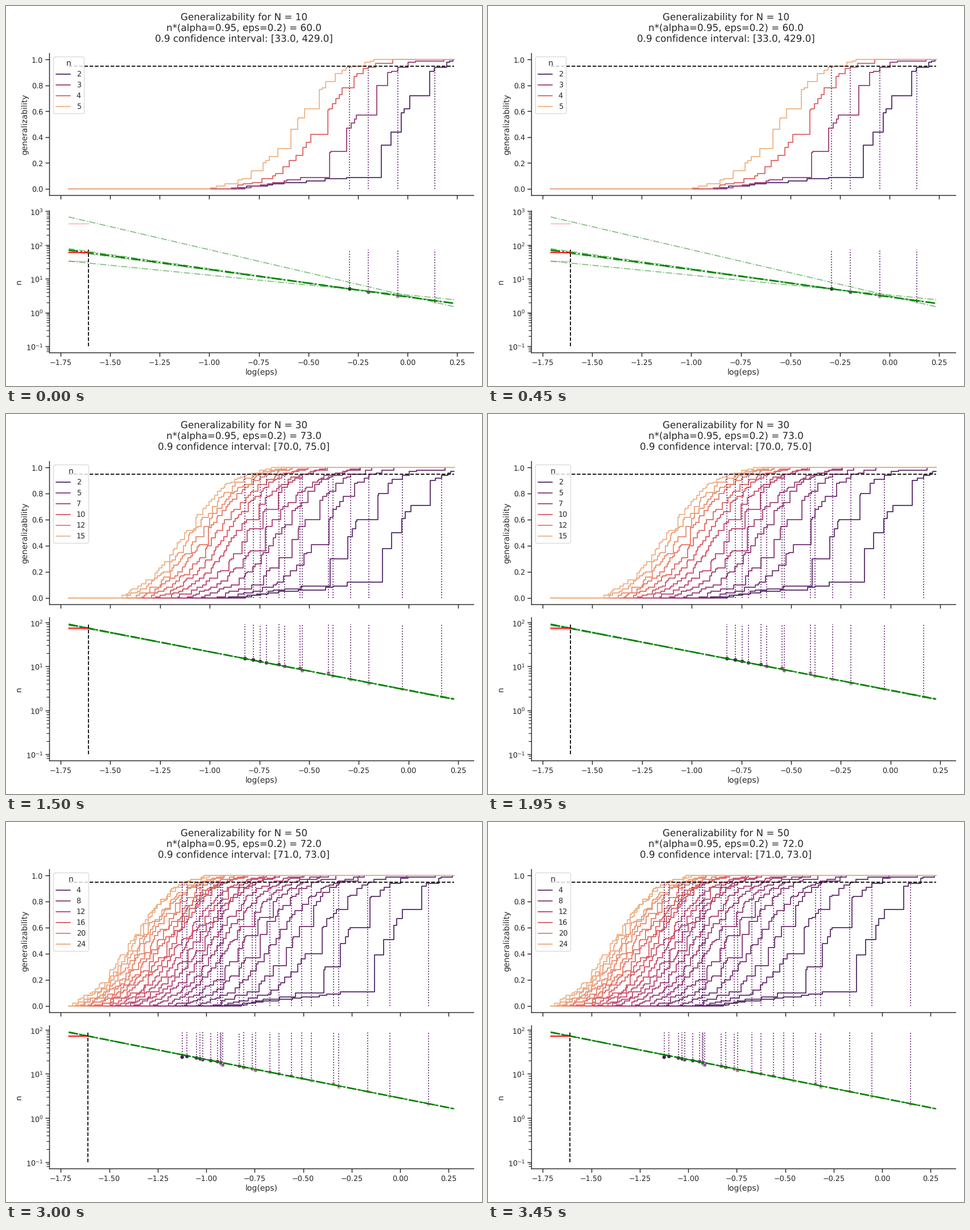
A matplotlib script for the animation above (3.75 s loop, 837 px wide and 669 px high).

```python
import numpy as np
import matplotlib.pyplot as plt
from matplotlib.animation import FuncAnimation
from matplotlib.colors import LinearSegmentedColormap
from matplotlib.lines import Line2D

W, H, DPI = 837, 669, 96
K = 0.872  # point scale of the whole figure
INK = "0.15"
X0, X_EPS = np.log(0.2) - 0.1, np.log(0.2)
LEFT, RIGHT = 76.3, 822.0
DOTS = "#5a1768"

plt.rcParams.update({
    "font.family": "DejaVu Sans",
    "font.size": 12 * K,
    "text.hinting": "none",
    "text.color": INK, "axes.labelcolor": INK, "axes.edgecolor": INK,
    "xtick.color": INK, "ytick.color": INK,
    "axes.labelsize": 12 * K, "axes.labelpad": 4 * K, "axes.linewidth": 1.25 * K,
    "axes.spines.top": False, "axes.spines.right": False,
    "lines.linewidth": 1.5 * K, "lines.solid_capstyle": "round",
    "legend.fontsize": 11 * K, "legend.title_fontsize": 12 * K,
    "patch.linewidth": K,
})
for axis in ("xtick", "ytick"):
    plt.rcParams.update({
        f"{axis}.labelsize": 11 * K,
        f"{axis}.major.size": 6 * K, f"{axis}.major.width": 1.25 * K,
        f"{axis}.minor.size": 4 * K, f"{axis}.minor.width": K,
        f"{axis}.major.pad": 3.5 * K, f"{axis}.minor.pad": 3.5 * K,
    })

CURVES = LinearSegmentedColormap.from_list("curves", [
    "#4b2362", "#6c2b6d", "#8f3371", "#b13c6c",
    "#d14a61", "#e3685c", "#e98d6b", "#edb081"])
POINTS = LinearSegmentedColormap.from_list("points", ["#edd1cb", "#aa688f", "#2d1e3e"])

# fit, high and low give n at the left and right end of each line
RUNS = [
    dict(N=10, best=60, ci=(33, 429), x_end=0.2355, step=1,
         fit=(71.3, 1.865), high=(677, 1.48), low=(33.3, 2.4)),
    dict(N=20, best=85, ci=(77, 98), x_end=0.237, step=1.5,
         fit=(102.7, 1.7), high=(125, 1.66), low=(92, 1.78)),
    dict(N=30, best=73, ci=(70, 75), x_end=0.23, step=2.5,
         fit=(90, 1.78), high=(92.3, 1.76), low=(86, 1.86)),
    dict(N=40, best=76, ci=(74, 77), x_end=0.224, step=3,
         fit=(92.5, 1.81), high=(94.8, 1.79), low=(90, 1.84)),
    dict(N=50, best=72, ci=(71, 73), x_end=0.279, step=4,
         fit=(88, 1.62), high=(89.3, 1.61), low=(86.5, 1.63)),
]

LEVELS = np.arange(1, 101)
SHAPE_P = (1, 10, 20, 30, 40, 50, 60, 70, 80, 90, 95, 97, 100)
BELOW = np.array([-1, -0.65, -0.4, -0.18, 0])
ABOVE = np.array([0.16, 0.33, 0.53, 0.77, 1, 1.14, 1.4])


def sizes(run):
    return np.arange(2, run["N"] // 2 + 1)


def fit_x(run, n):
    """Position where the fitted line reaches n; small n fall a little short."""
    start, end = np.log(run["fit"])
    on_line = X0 + (start - np.log(n)) / (start - end) * (run["x_end"] - X0)
    return on_line - 0.15 / n**2


def crossings(run):
    """Positions where each curve reaches 95 percent."""
    n = sizes(run)
    rng = np.random.default_rng(run["N"])
    return fit_x(run, n) + rng.normal(0, 0.02, len(n))


def samples(run, n, q95):
    """Sorted positions at which the curve of n climbs by one percent."""
    rng = np.random.default_rng(100 * run["N"] + n)
    q50 = fit_x(run, n) - 0.32 + 0.2 / n
    lower = q50 + BELOW * (0.24 - 0.0015 * n)
    tail = lower[0] - 0.1 - 2 / n**2
    xs = np.r_[tail, lower, q50 + ABOVE * (q95 - q50)]
    x = np.interp(LEVELS, SHAPE_P, xs) + rng.normal(0, 0.008, 100)
    # Few distinct values exist for small n, so steps cluster
    gaps = np.random.default_rng(n).exponential(max(0.1 / n, 0.009), 800)
    grid = -2 + np.cumsum(gaps)
    x = np.sort(grid[np.searchsorted(grid, x).clip(max=len(grid) - 1)])
    x[:94] = np.minimum(x[:94], q95)
    x[94:] = np.maximum(x[94:], q95)
    return x


def add_axes(fig, top, bottom, x_end):
    ax = fig.add_axes([LEFT / W, 1 - bottom / H, (RIGHT - LEFT) / W, (bottom - top) / H])
    margin = 0.05 * (x_end - X0)
    ax.set_xticks(np.arange(-1.75, 0.3, 0.25))
    ax.set_xlim(X0 - margin, x_end + margin)
    return ax


def draw_curves(ax, run, shade):
    x_end, q95 = run["x_end"], crossings(run)
    for n, q in zip(sizes(run), q95):
        x = np.maximum(samples(run, n, q), X0)
        x = x[x <= x_end]
        p = np.arange(len(x) + 1) / 100
        ax.step(np.r_[X0, x, x_end], np.r_[p, p[-1]], where="post", color=CURVES(shade(n)))
    ax.plot([X0, x_end], [0.95, 0.95], "--", color="black")
    ax.vlines(q95, 0, 0.95, colors=DOTS, linestyles=":", linewidth=1.5 * K)
    ax.set_ylim(-0.05, 1.05)
    ax.set_ylabel("generalizability")
    ax.tick_params(labelbottom=False)
    ticks = np.arange(1, 8) * run["step"]
    ticks = ticks[(ticks >= 2) & (ticks < run["N"] / 2 + 1)].astype(int)
    handles = [Line2D([], [], color=CURVES(shade(n)), label=str(n)) for n in ticks]
    ax.legend(handles=handles, title="n", loc="upper left")


def draw_fit(ax, run, shade):
    span = [X0, run["x_end"]]
    fit, high, low = (np.array(run[key]) for key in ("fit", "high", "low"))
    peak = fit[0]
    n, q95 = sizes(run), crossings(run)
    ax.set_yscale("log")
    ax.scatter(q95, n, s=36 * K * K, c=POINTS(shade(n)),
               edgecolors="white", linewidths=0.48 * K, zorder=1)
    ax.vlines(q95, n, peak, colors=DOTS, linestyles=":", linewidth=1.5 * K)
    for bound, share in ((high, 1), (high, 0.04), (low, 0.1), (low, 1)):
        ax.plot(span, fit * (bound / fit) ** share, "-.", color="green", alpha=0.5)
    ax.plot(span, fit, "-.", color="green", linewidth=2.25 * K)
    for bound in run["ci"]:
        ax.plot([X0, X_EPS], [bound, bound], color="red", alpha=0.35, linewidth=1.2 * K)
    ax.plot([X0, X_EPS], [run["best"]] * 2, color="red")
    ax.plot([X_EPS, X_EPS], [0.1, peak], "--", color="black")
    top = np.log10(high[0])
    margin = 0.05 * (top + 1)
    ax.set_ylim(10 ** (-1 - margin), 10 ** (top + margin))
    ax.set_xlabel("log(eps)")
    ax.set_ylabel("n")


def draw(i):
    run = RUNS[i % len(RUNS)]

    def shade(n):
        return (n - 2) / (run["N"] / 2 - 2)

    # A label above the lower axes pushes both panels apart
    gap = 1.9 if run["high"][0] > 500 else 0
    low, high = run["ci"]
    fig.clear()
    fig.suptitle(f"Generalizability for N = {run['N']}\n"
                 f"n*(alpha=0.95, eps=0.2) = {run['best']:.1f}\n"
                 f"0.9 confidence interval: [{low:.1f}, {high:.1f}]",
                 fontsize=14.4 * K, y=0.981)
    draw_curves(add_axes(fig, 83, 335.3 - gap, run["x_end"]), run, shade)
    draw_fit(add_axes(fig, 358.1 + gap, 610.4, run["x_end"]), run, shade)
    return []


fig = plt.figure(figsize=(W / DPI, H / DPI), dpi=DPI, facecolor="white")
anim = FuncAnimation(fig, draw, frames=len(RUNS), interval=750, repeat=True, repeat_delay=0)
plt.show()
```
